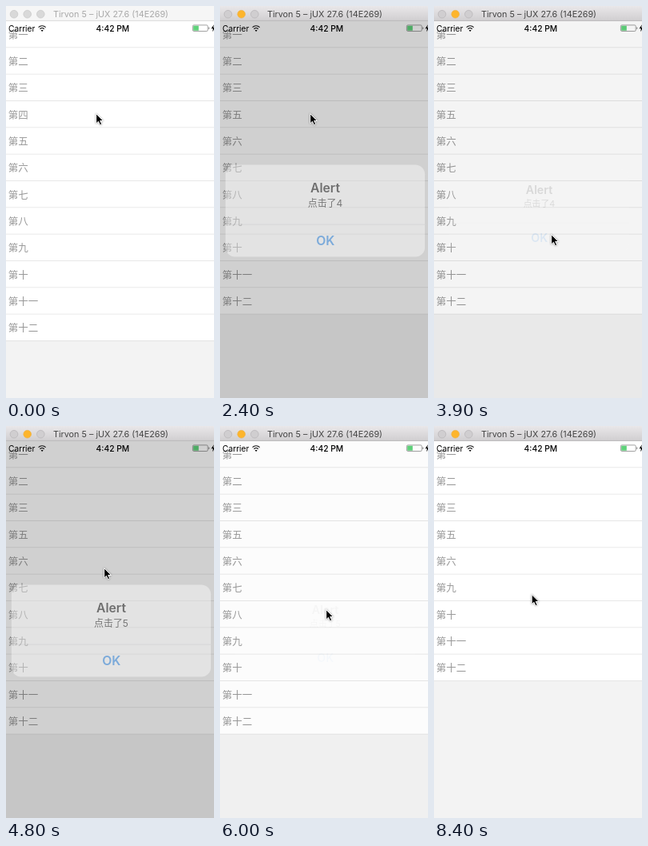
An HTML page that plays this animation: 260 px wide and 490 px high, repeating every 9.1 s.

```html
<!DOCTYPE html>
<html lang="zh-CN">
<head>
<meta charset="utf-8">
<title>List with alert</title>
<style>
  html, body { margin: 0; width: 100%; height: 100%; overflow: hidden; background: #f3f3f3; }
  svg { display: block; width: 260px; height: 490px; }
  text { font-family: Inter, "Noto Sans CJK SC", "Noto Sans CJK", sans-serif; }
  .mid { text-anchor: middle; }
  .row text { font-size: 12.5px; font-weight: 300; fill: #999; }
  #cursor { filter: drop-shadow(0 .8px .8px rgba(0, 0, 0, .4)); }
</style>
</head>
<body>
<svg viewBox="0 0 260 490">
  <defs>
    <linearGradient id="bar" x2="0" y2="1">
      <stop offset="0" stop-color="#e9e7e9"/>
      <stop offset="1" stop-color="#d0ced0"/>
    </linearGradient>
  </defs>

  <rect width="260" height="490" fill="#f3f3f3"/>
  <g id="rows"></g>

  <g id="status">
    <text x="3" y="31.5" font-size="10.2">Carrier</text>
    <g fill="none" stroke="#111" stroke-width="1.2">
      <path d="M40.6 26.6a6.4 6.4 0 0 1 9 0"/>
      <path d="M42.5 28.7a3.7 3.7 0 0 1 5.2 0"/>
    </g>
    <path d="M45.1 32l-1.5-1.6a2.1 2.1 0 0 1 3 0z" fill="#111"/>
    <text class="mid" x="133.4" y="31.5" font-size="10.3" font-weight="500">4:42 PM</text>
    <rect x="233.4" y="23.9" width="18.8" height="7.6" rx="1.4" fill="#fff" stroke="#8a8a8a" stroke-width=".8"/>
    <rect x="234.2" y="24.7" width="6.6" height="6" fill="#5fd27a"/>
    <path d="M253.2 26.2v3q1.2-.3 1.2-1.5t-1.2-1.5z" fill="#8a8a8a"/>
    <path d="M259.9 23.2l-3.4 5h2.4l-.8 4 3.6-5.2h-2.6z"/>
  </g>

  <rect id="dim" y="18.7" width="260" height="471.3" fill="#000"/>

  <g id="alert">
    <rect x="19" y="204" width="225" height="104" rx="10.8" fill="#fafafa" fill-opacity=".97"/>
    <text class="mid" x="131.5" y="235" font-size="14.2" font-weight="600">Alert</text>
    <text id="msg" class="mid" x="131.5" y="251.2" font-size="10.8" fill="#111"></text>
    <path d="M19 271.5h225" stroke="#dcdcde" stroke-width=".8"/>
    <text class="mid" x="131.8" y="295" font-size="14.2" font-weight="600" fill="#1a7fe6">OK</text>
  </g>

  <g id="title">
    <rect id="strip" width="260" height="18.7"/>
    <path id="edge" d="M0 18.4h260" stroke-width=".8"/>
    <g id="lights" stroke-width=".7">
      <circle cx="10" cy="10.2" r="4.8"/>
      <circle cx="26.7" cy="10.2" r="4.8"/>
      <circle cx="43.3" cy="10.2" r="4.8"/>
    </g>
    <text id="name" class="mid" x="131" y="14" font-size="10.8">Tirvon 5 – jUX 27.6 (14E269)</text>
  </g>

  <path id="cursor" d="M0 0v12.2l2.8-2.6 2 4.4 2.2-1-2-4.2h3.9z" fill="#000" stroke="#fff" stroke-width="1" stroke-linejoin="round"/>
</svg>

<script>
const LOOP = 9100, STEP = 100, TOP = 19, PITCH = 33.33;
const $ = id => document.getElementById(id);
const set = (el, attrs) => { for (const k in attrs) el.setAttribute(k, attrs[k]); };

const removedAt = { 3: 2000, 6: 7200, 7: 8400 };
const presses = [{ row: 6, from: 6800, to: 7200 }, { row: 7, from: 8000, to: 8400 }];
const alerts = [
  { text: '点击了4', show: 2280, hide: 3690 },
  { text: '点击了5', show: 4680, hide: 5690 }
];
// time, x, y of the pointer tip
const path = [
  [2900, 112.7, 134.7], [3000, 119, 153], [3100, 139, 229], [3200, 147.7, 277.7],
  [3400, 146.7, 285.7], [3900, 146.7, 285.7], [4000, 144, 272], [4400, 122.7, 177.7],
  [4900, 122.7, 177.7], [5100, 126, 221], [5300, 131, 277], [5500, 132, 288],
  [5800, 132, 286], [6000, 132.7, 229.7], [6300, 122.2, 212.5],
  [7400, 122.2, 212.5], [7500, 122.2, 210.7]
];

const rows = [...'一二三四五六七八九十', '十一', '十二'].map(n => {
  const g = document.createElementNS('http://www.w3.org/2000/svg', 'g');
  set(g, { class: 'row' });
  g.innerHTML = `<rect width="260" height="${PITCH}"/>
    <path d="M0 ${PITCH - .4}h260" stroke="#dedede" stroke-width=".8"/>
    <text x="2.7" y="21.6">第${n}</text>`;
  $('rows').append(g);
  return g;
});

// Remaining distance of a critically damped spring
const spring = (ms, rate) => {
  const x = Math.max(0, ms) / 1000 * rate;
  return (1 + x) * Math.exp(-x);
};

function pointer(t) {
  const i = path.findIndex(p => p[0] > t);
  if (i === 0) return path[0].slice(1);
  if (i < 0) return path[path.length - 1].slice(1);
  const [a, b] = [path[i - 1], path[i]];
  const k = (t - a[0]) / (b[0] - a[0]);
  return [a[1] + (b[1] - a[1]) * k, a[2] + (b[2] - a[2]) * k];
}

function drawTitle(active) {
  set($('strip'), { fill: active ? 'url(#bar)' : '#f6f6f6' });
  set($('edge'), { stroke: active ? '#b4b2b4' : '#d6d6d6' });
  set($('name'), { fill: active ? '#444' : '#a9a9a9' });
  [...$('lights').children].forEach((dot, i) => {
    const lit = active && i === 1;
    set(dot, {
      fill: lit ? '#fdb52c' : active ? '#d0ced0' : '#d9d9d9',
      stroke: lit ? '#eeb040' : active ? '#b6b4b6' : '#c6c6c6'
    });
  });
}

function drawRows(t) {
  let slot = 0;
  rows.forEach((row, i) => {
    const gone = t >= removedAt[i];
    row.style.display = gone ? 'none' : '';
    if (gone) return;
    const held = presses.some(p => p.row === i && t >= p.from && t < p.to);
    set(row, { transform: `translate(0 ${TOP + PITCH * slot++})` });
    set(row.firstChild, { fill: held ? '#d9d9d9' : '#fff' });
  });
}

function drawAlert(t) {
  const a = alerts.find(a => t >= a.show && t < a.hide + 660);
  let alpha = 0, scale = 1;
  if (a) {
    const left = spring(t - a.show, 13);
    alpha = (1 - left) * spring(t - a.hide, 18);
    scale = 1 + .2 * left;
    $('msg').textContent = a.text;
  }
  set($('dim'), { opacity: .4 * alpha });
  set($('alert'), {
    opacity: alpha,
    transform: `translate(131.5 256) scale(${scale}) translate(-131.5 -256)`
  });
}

function draw(t) {
  drawTitle(t >= 1900);
  drawRows(t);
  drawAlert(t);
  set($('cursor'), { transform: `translate(${pointer(t).join(' ')})` });
}

const start = performance.now();
function tick() {
  const t = (performance.now() - start) % LOOP;
  draw(Math.floor(t / STEP) * STEP);
  requestAnimationFrame(tick);
}
tick();
</script>
</body>
</html>
```
